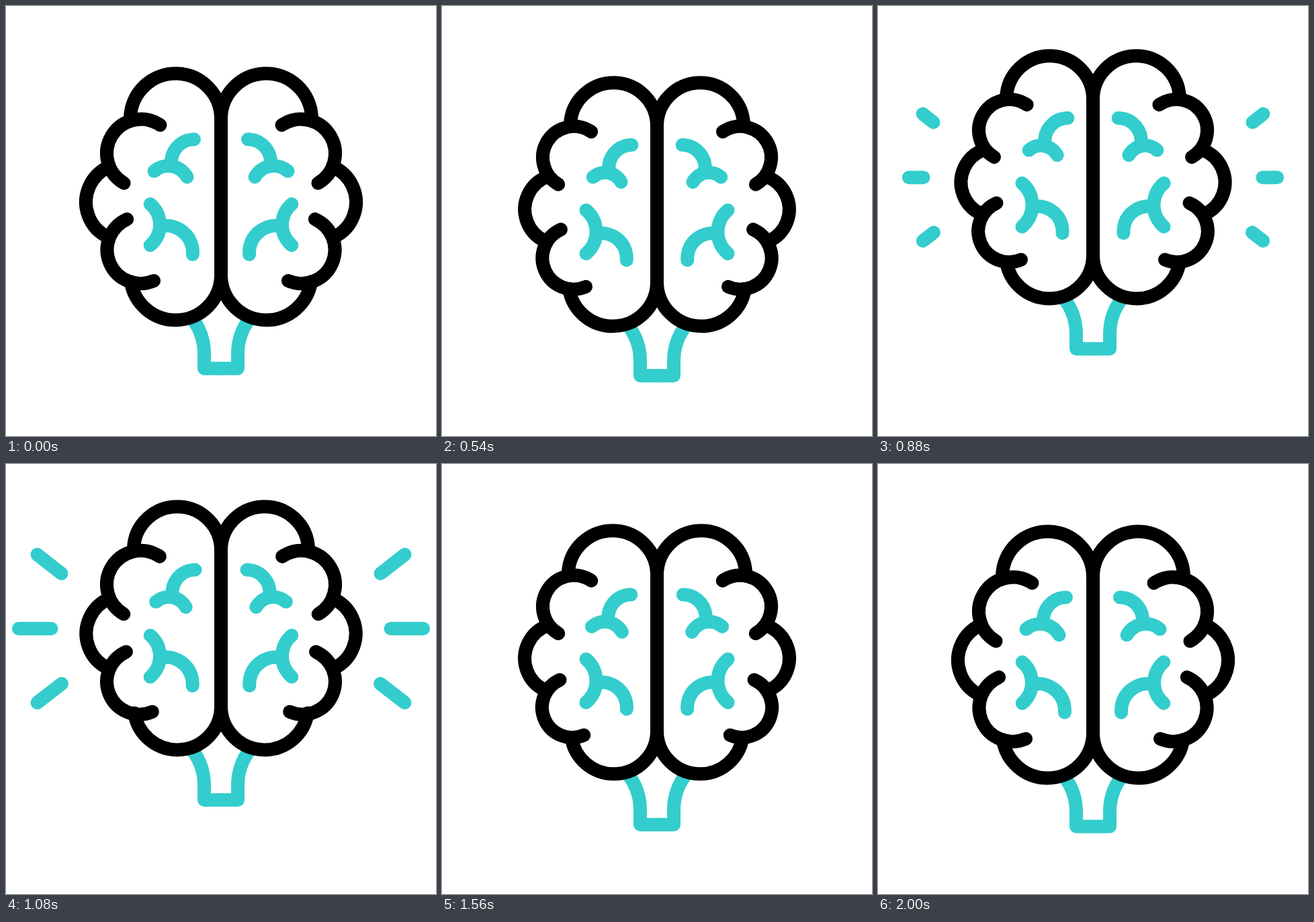
Recreate the animation shown at these times as an HTML page with a canvas. Size 640 px wide and 640 px high, loop 2400 ms.

```html
<!DOCTYPE html>
<html>
<head>
<meta charset="utf-8">
<title>Brain</title>
<style>
html, body { margin: 0; height: 100%; overflow: hidden; background: #fff; }
canvas { display: block; width: 100vw; height: 100vh; }
</style>
</head>
<body>
<canvas width="640" height="640"></canvas>
<script>
const ctx = document.querySelector('canvas').getContext('2d');
const TEAL = '#33cdcd', LOOP = 2400;

// Monotone cubic curve through [time, value] keys
function track(times, values) {
  const slope = i => (values[i + 1] - values[i]) / (times[i + 1] - times[i]);
  const tangent = i => {
    if (i === 0 || i === times.length - 1) return 0;
    const a = slope(i - 1), b = slope(i);
    return a * b <= 0 ? 0 : 2 * a * b / (a + b);
  };
  return t => {
    if (t <= times[0]) return values[0];
    const j = times.findIndex(k => k >= t);
    if (j < 0) return values.at(-1);
    const i = j - 1, h = times[j] - times[i], u = (t - times[i]) / h, v = 1 - u;
    return v * v * (1 + 2 * u) * values[i] + u * u * (3 - 2 * u) * values[j]
      + h * u * v * (v * tangent(i) - u * tangent(j));
  };
}

const lift = track(
  [200, 400, 700, 740, 1080, 1280, 1370, 1400, 1690, 1820, 2000],
  [0, 26, -15.5, -18.5, -39.5, -40, -43.8, -43.5, 26, 17, 0]);

// How far each part is squeezed: 0 relaxed, 1 contracted
const squeeze = (...values) => track([200, 380, 700, 1080, 1400, 1700, 2000], values);
const parts = {
  crown: squeeze(0, .55, 1, .7, .9, 0, 0),
  base: squeeze(0, .1, .65, .65, .65, 1, 0),
  side: squeeze(0, .03, 1, .05, 1, .08, 0),
  lower: squeeze(0, .05, 1, .2, 1, .5, 0),
  fold: squeeze(0, .4, 1, .5, 1, 0, 0)
};

const rays = [
  [82.5, 202.5, 45.5, 173.5],
  [67.5, 284.5, 17.5, 284.5],
  [83, 366.5, 45.5, 395.5]
];

const mix = (a, b, p) => a + (b - a) * p;
const ramp = (t, from, to) => Math.min(1, Math.max(0, (t - from) / (to - from)));

function arc(x, y, r, from, to) {
  ctx.arc(x, y, r, from * Math.PI / 180, to * Math.PI / 180);
}

function stroke(color, build, cap = 'round') {
  ctx.strokeStyle = color;
  ctx.lineCap = cap;
  ctx.beginPath();
  build();
  ctx.stroke();
}

function drawHalf(t) {
  const { crown, base, side, lower, fold } = parts;
  const c = crown(t), b = base(t), s = side(t), l = lower(t), f = fold(t);
  const curve = (color, ...a) => stroke(color, () => arc(...a));

  // Stem
  stroke(TEAL, () => {
    ctx.moveTo(277, 465);
    ctx.quadraticCurveTo(295, 488, 295, 518);
    ctx.lineTo(295, 539.5);
    ctx.lineTo(321, 539.5);
  }, 'butt');

  // Outline and lobes
  stroke('#000', () => {
    const top = 67.5 - 3.5 * c, bottom = 67.5 - 4 * b;
    arc(320 - top, 168, top, 182, 360);
    arc(320 - bottom, 400, bottom, 0, 171);
  });
  curve('#000', mix(176.5, 174, s), 292, mix(57.5, 47, s), 115, 245 + 11 * s);
  curve('#000', 201 - 9 * s, 219.5 - 9 * s, 51 - 9 * s, 120, 304);
  curve('#000', mix(200.5, 192, l), mix(363, 365.5, l), mix(50, 43.5, l), 67, 246);

  // Inner folds
  curve(TEAL, 280 + 3 * f, 232.5 - 3 * f, 34, 175, 270);
  curve(TEAL, mix(241.5, 243, f), 270 - 7 * f, 32 - 6 * f, 229, 331);
  curve(TEAL, 189 - 3 * s, 325.5, 40 + 4 * s, -50, 50);
  curve(TEAL, 238 - s, 367 - 4 * s, 40 - 5 * s, -100, 4);

  // Rays grow outwards, then are trimmed from the inside
  const head = ramp(t, 720, 1090), tail = ramp(t, 1150, 1520);
  if (head > tail) {
    for (const [x0, y0, x1, y1] of rays) {
      stroke(TEAL, () => {
        ctx.moveTo(mix(x0, x1, tail), mix(y0, y1, tail));
        ctx.lineTo(mix(x0, x1, head), mix(y0, y1, head));
      });
    }
  }
}

function frame() {
  const t = Math.floor(performance.now() % LOOP / 20) * 20;
  const y = lift(t);
  ctx.setTransform(1, 0, 0, 1, 0, 0);
  ctx.fillStyle = '#fff';
  ctx.fillRect(0, 0, 640, 640);
  ctx.lineWidth = 20;
  ctx.lineJoin = 'round';
  ctx.setTransform(1, 0, 0, 1, 0, y);
  drawHalf(t);
  ctx.setTransform(-1, 0, 0, 1, 640, y);
  drawHalf(t);
  requestAnimationFrame(frame);
}
frame();
</script>
</body>
</html>
```
